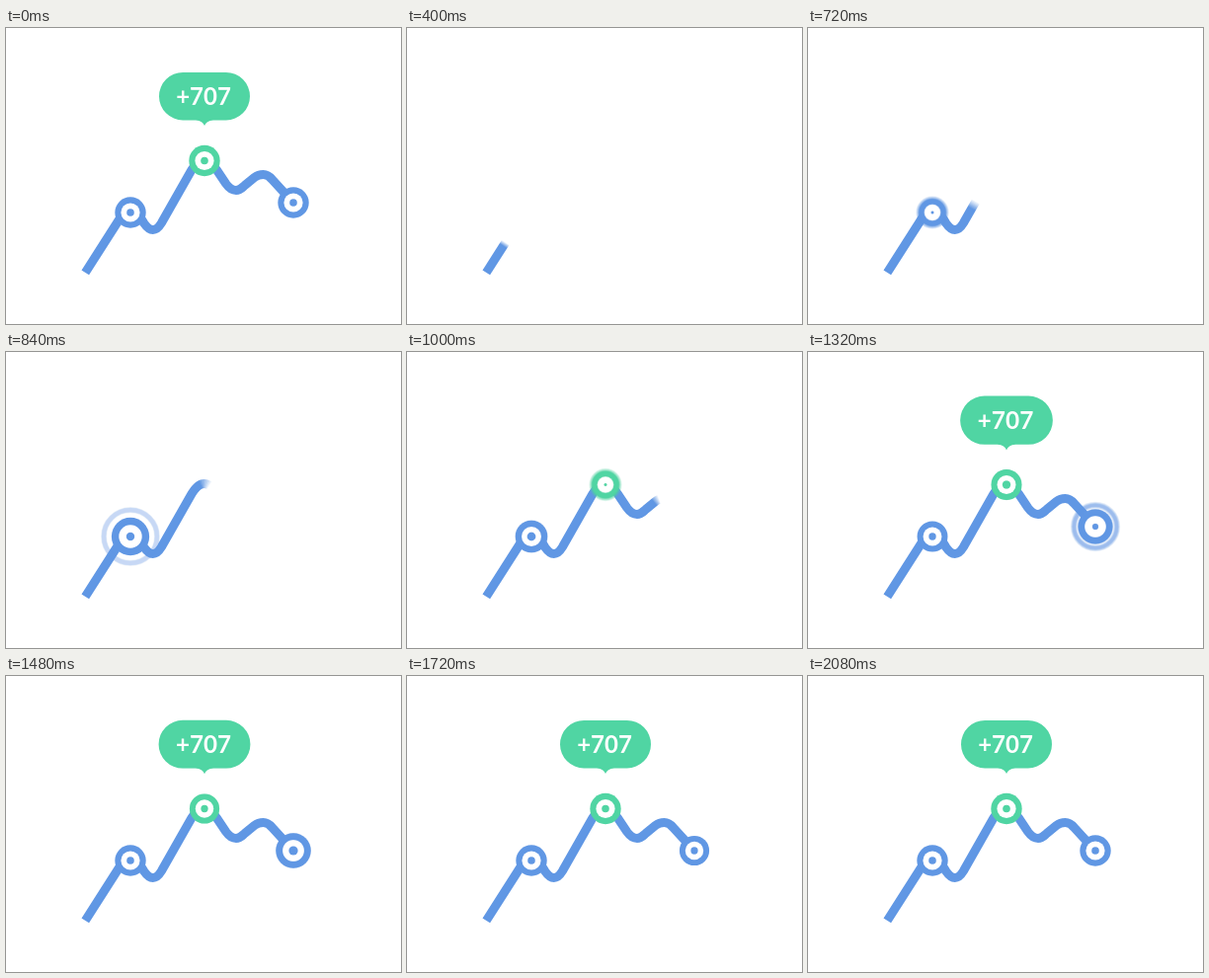
An HTML page with a canvas for the animation above (3000 ms loop, 400 by 300 pixels).

```html
<!DOCTYPE html>
<html lang="en">
<head>
<meta charset="utf-8">
<title>Line chart</title>
<style>
html, body { margin: 0; width: 100%; height: 100%; overflow: hidden; background: #fff; }
canvas { display: block; }
</style>
</head>
<body>
<canvas id="stage" width="400" height="300"></canvas>
<script>
const LOOP = 3000, STEP = 40, SHUTTER = 20, SAMPLES = 8;
const BLUE = '#6097e4', GREEN = '#50d5a3';

const view = document.getElementById('stage').getContext('2d');
const buffer = document.createElement('canvas');
buffer.width = 400;
buffer.height = 300;
const c = buffer.getContext('2d');

const line = new Path2D(
  'M80.3 247.8 L115 193.5 Q126 177 137 193.5 L139.5 197.5 Q149 211.5 157.5 197.5 ' +
  'L188 143.8 Q200.5 123 213.5 144 L222.5 157.5 C226 162.5 229 164.5 233 164.5 ' +
  'S239 162 241.5 159.7 L251.5 151.5 C254.5 149.2 257.5 148.5 260.5 148.5 ' +
  'S267 150.5 269.5 153.5 L291 177');
const bubble = new Path2D(
  'M179.2 45 H222.8 A24.2 24.2 0 0 1 222.8 93.4 H210 Q202.5 94 201 99 ' +
  'Q199.5 94 192 93.4 H179.2 A24.2 24.2 0 0 1 179.2 45 Z');

// Tip of the line: time, distance, speed
const tipKeys = [
  [80, 0, 0], [400, 34, .22], [720, 142, .44],
  [1000, 271, .31], [1160, 301.5, .12], [1400, 322, 0]
];
const nodes = [
  { x: 126, y: 187, color: BLUE, born: 600 },
  { x: 201, y: 134.5, color: GREEN, born: 880 },
  { x: 291, y: 177, color: BLUE, born: 1140 }
];

const clamp = v => Math.min(1, Math.max(0, v));
const sineOut = v => Math.sin(clamp(v) * Math.PI / 2);
const mix = (a, b, v) => a + (b - a) * (1 - Math.cos(clamp(v) * Math.PI)) / 2;

function tipAt(t) {
  if (t <= 80) return 0;
  if (t >= 1400) return 400;
  const i = tipKeys.findIndex(k => k[0] > t);
  const [t0, d0, v0] = tipKeys[i - 1], [t1, d1, v1] = tipKeys[i];
  const h = t1 - t0, u = (t - t0) / h, w = 1 - u;
  return d0 * w * w * (1 + 2 * u) + d1 * u * u * (3 - 2 * u) + h * u * w * (v0 * w - v1 * u);
}

function bounce(p) {
  if (p < 240) return 1.22 * sineOut(p / 240);
  if (p < 500) return mix(1.22, .955, (p - 240) / 260);
  return mix(.955, 1, (p - 500) / 370);
}

function disc(x, y, r, color) {
  c.fillStyle = color;
  c.beginPath();
  c.arc(x, y, r, 0, 2 * Math.PI);
  c.fill();
}

function drawLine(t) {
  const length = tipAt(t);
  if (!length) return;
  c.setLineDash([length, 1000]);
  c.lineWidth = 9;
  c.strokeStyle = BLUE;
  c.stroke(line);
  c.setLineDash([]);
}

function drawHalo({ x, y, color }, p) {
  const r = 30.5 * sineOut((p - 40) / 240) - 2.5;
  if (r <= 0 || p >= 320) return;
  c.globalAlpha = clamp((320 - p) / 230);
  c.lineWidth = 5;
  c.strokeStyle = color;
  c.beginPath();
  c.arc(x, y, r, 0, 2 * Math.PI);
  c.stroke();
  c.globalAlpha = 1;
}

function drawNode(node, t) {
  const p = t - node.born;
  if (p <= 0) return;
  const { x, y, color } = node, size = bounce(p);
  drawHalo(node, p);
  disc(x, y, 15.7 * size, color);
  disc(x, y, 9.6 * size, '#fff');
  disc(x, y, 3.8 * bounce(p - 70), color);
}

function drawBubble(t) {
  const p = t - 1040;
  if (p <= 0) return;
  const size = p < 210 ? 1.02 * sineOut(p / 210) : mix(1.02, 1, (p - 210) / 430);
  c.save();
  c.translate(201, 69);
  c.scale(size, size);
  c.translate(-201, -69);
  c.globalAlpha = clamp(p / 160);
  c.fillStyle = GREEN;
  c.fill(bubble);
  c.globalAlpha = 1;
  c.fillStyle = '#fff';
  c.font = 'bold 24px Lato, sans-serif';
  c.textAlign = 'center';
  c.fillText('+707', 200, 77.8);
  c.restore();
}

function drawScene(t) {
  c.fillStyle = '#fff';
  c.fillRect(0, 0, 400, 300);
  drawLine(t);
  nodes.forEach(node => drawNode(node, t));
  drawBubble(t);
}

// Average several moments for motion blur
function render(now) {
  let t = Math.floor(now % LOOP / STEP) * STEP;
  if (t < 80) t = LOOP;
  for (let i = 0; i < SAMPLES; i++) {
    drawScene(t + ((i + .5) / SAMPLES - .5) * SHUTTER);
    view.globalAlpha = 1 / (i + 1);
    view.drawImage(buffer, 0, 0);
  }
}

const start = performance.now();
function tick() {
  render(performance.now() - start);
  requestAnimationFrame(tick);
}
tick();
</script>
</body>
</html>
```
